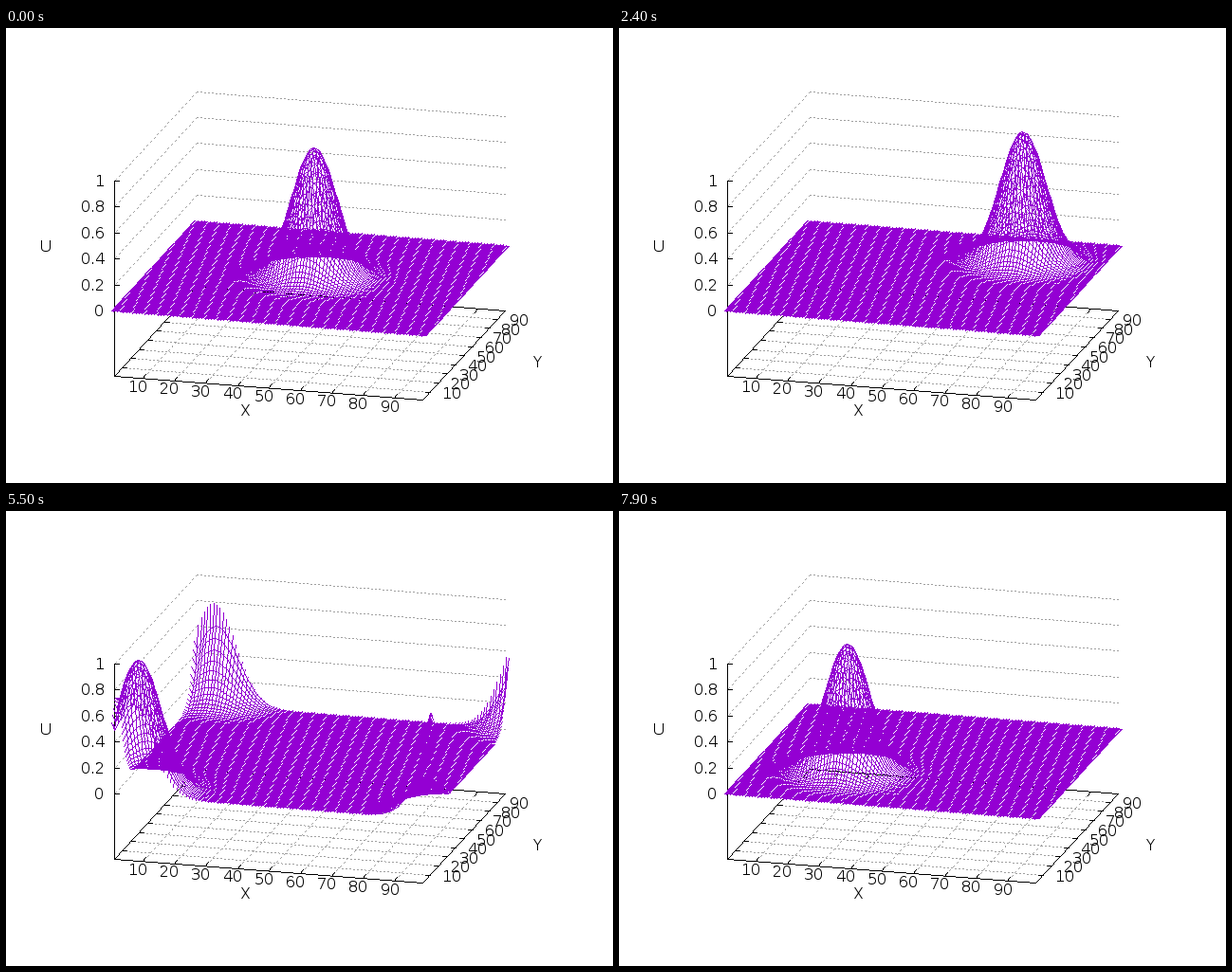
A matplotlib script that plays this animation: 640x480 px, repeating every 8000 ms.

```python
import numpy as np
import matplotlib.pyplot as plt
from matplotlib.animation import FuncAnimation

W, H, DPI = 640, 480, 100
FRAMES, INTERVAL = 80, 100
N = 99                                    # periodic cells, numbered 1..99
ORIGIN = np.array([114.2, 298.0])         # screen place of (1, 1, 0)
EX = np.array([325.1, 25.8]) / (N - 1)
EY = np.array([87.1, -94.3]) / (N - 1)
EZ = np.array([0.0, -137.0])
FLOOR = -0.5
BLACK, GRAY, PURPLE = (0, 0, 0), (160, 160, 160), (148, 0, 211)

# crisp one pixel stems
plt.rcParams["text.hinting"] = "no_autohint"
plt.rcParams["text.hinting_factor"] = 1

fig = plt.figure(figsize=(W / DPI, H / DPI), dpi=DPI, facecolor="white")
ax = fig.add_axes([0, 0, 1, 1])
ax.axis("off")


def project(x, y, z):
    x, y, z = (np.asarray(v, float)[..., None] for v in (x, y, z))
    p = ORIGIN + (x - 1) * EX + (y - 1) * EY + z * EZ
    return np.floor(p + 0.5).astype(int)


def stroke(img, a, b, color, dotted=False):
    """Bresenham lines, one pixel wide, from points a to points b."""
    a, b = np.reshape(a, (-1, 2)), np.reshape(b, (-1, 2))
    d = b - a
    major = np.abs(d).argmax(axis=1)
    back = d[np.arange(len(d)), major] < 0
    start = np.where(back[:, None], b, a)[:, None]
    d = np.where(back[:, None], -d, d)[:, None]
    size = np.abs(d).max(axis=2, keepdims=True)
    k = np.arange(size.max() + 1)
    if dotted:
        k = k[k % 4 < 2]
    k = np.minimum(k[None, :, None], size)
    move = (2 * np.abs(d) * k + size) // np.maximum(2 * size, 1)
    p = (start + np.sign(d) * move).reshape(-1, 2)
    img[p[:, 1], p[:, 0]] = color


def path(img, *corners, color=BLACK, dotted=False):
    p = [project(*c) for c in corners]
    for a, b in zip(p, p[1:]):
        stroke(img, a, b, color, dotted)


def grid(img, *corners):
    path(img, *corners, color=GRAY, dotted=True)


def tick(img, at, step, length=5):
    p = project(*at)
    v = np.array(step) / np.hypot(*step) * length
    stroke(img, p, p + np.rint(v).astype(int), BLACK)


def label(x, y, text, ha="center"):
    ax.text(x, y, text, ha=ha, va="center_baseline", fontsize=16 * 72 / DPI,
            family="DejaVu Sans", color="black")


def draw_box():
    img = np.full((H, W, 3), 255, np.uint8)
    ticks = range(10, 100, 10)
    for t in ticks:
        grid(img, (t, 1, FLOOR), (t, N, FLOOR))
        grid(img, (1, t, FLOOR), (N, t, FLOOR))
    for z in np.arange(6) / 5:
        grid(img, (1, 1, z), (1, N, z), (N, N, z))
        tick(img, (1, 1, z), (1, 0))
    for t in ticks:
        tick(img, (t, 1, FLOOR), EY)
        tick(img, (t, N, FLOOR), -EY)
        tick(img, (1, t, FLOOR), EX)
        tick(img, (N, t, FLOOR), -EX)
    path(img, (1, 1, FLOOR), (N, 1, FLOOR), (N, N, FLOOR), (1, N, FLOOR),
         (1, 1, FLOOR), (1, 1, 1))
    return img


def draw_labels():
    for k in range(9):
        text = str(10 * (k + 1))
        label(139 + 33.2 * k, 377.5 + 2.63 * k, text)
        label(470 + 8.9 * k, 385 - 9.6 * k, text)
    for k in range(6):
        label(103.5, 298 - 27.4 * k, f"{k / 5:g}", ha="right")
    label(253, 403, "X")
    label(561, 352, "Y")
    label(42, 230, "U")


box = draw_box()
view = ax.imshow(box, extent=(0, W, H, 0), interpolation="nearest",
                 aspect="auto")
draw_labels()

nodes = np.arange(N + 2)
gx, gy = np.meshgrid(nodes, nodes)
ghost = (gx % (N + 1) == 0) | (gy % (N + 1) == 0)


def pulse(center):
    d = (nodes - center + N / 2) % N - N / 2
    g = np.exp(-d ** 2 / 100)
    return np.outer(g, g)


def draw(n):
    center = 51 + n
    # the border cells lag one step behind the wave
    u = np.where(ghost, pulse(center - 1), pulse(center))
    p = project(gx, gy, u)
    img = box.copy()
    stroke(img, p[1:-1, :-1], p[1:-1, 1:], PURPLE)
    stroke(img, p[:-1, 1:-1], p[1:, 1:-1], PURPLE)
    view.set_data(img)
    return [view]


anim = FuncAnimation(fig, draw, frames=FRAMES, interval=INTERVAL,
                     repeat=True, repeat_delay=0)
plt.show()
```
